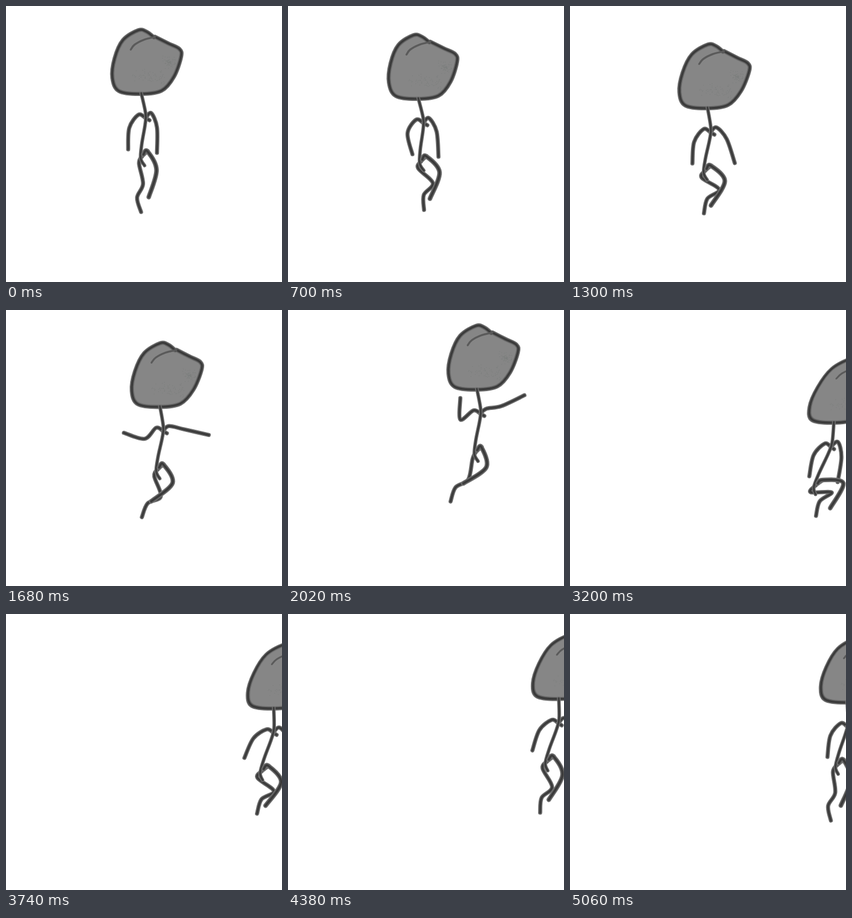
Recreate the animation shown at these times as an HTML page with a canvas. Size 500x500 px, loop 5080 ms.

```html
<!DOCTYPE html>
<html>
<head>
<meta charset="utf-8">
<style>
html, body { margin: 0; width: 100%; height: 100%; overflow: hidden; background: #fff; }
canvas { display: block; }
</style>
</head>
<body>
<canvas id="stage" width="500" height="500"></canvas>
<script>
const ctx = document.getElementById('stage').getContext('2d');
const LOOP = 5080;

// Body: time, then neck x, neck y and sideways lean.
const body = [
  [0, 245, 158, 0],
  [700, 236, 167, -.03],
  [1300, 249, 184, .05],
  [1640, 273, 177, .05],
  [2020, 342, 143, .03],
  [2250, 373, 128, .08],
  [2560, 411, 145, .17],
  [3200, 478, 203, .3],
  [3740, 485, 170, .2],
  [4340, 490, 153, .2],
  [5060, 502, 159, .17]
];

// Gestures: angles of the upper and lower bone in degrees from straight down, positive to the right.
const hangL = [-35, -3], backL = [-50, -19], raisedL = [-54, -179];
const hangR = [22, 0], swingR = [43, 20], reachR = [101, 116];
const stand = [11, -4, 26, -16], crouch = [57, -31, 44, -28], leap = [-11, -38, 15, -54];
const stride = [53, 30, 41, 28], squat = [98, -25, 90, -19];

const limbs = [
  [0, ...hangL, ...hangR, ...stand],
  [1300, ...hangL, ...swingR, ...crouch],
  [2020, ...raisedL, ...reachR, ...leap],
  [2560, ...backL, ...hangR, ...stride],
  [3200, ...hangL, ...hangR, ...squat],
  [3740, ...backL, ...swingR, ...crouch],
  [5060, ...hangL, ...hangR, ...stand]
];

// Hermite interpolation between uneven key times
function sample(keys, time) {
  const last = keys.length - 1;
  let k = 0;
  while (k < last - 1 && time >= keys[k + 1][0]) k++;
  const A = keys[Math.max(k - 1, 0)], B = keys[k], C = keys[k + 1], D = keys[Math.min(k + 2, last)];
  const span = C[0] - B[0], u = Math.min((time - B[0]) / span, 1), v = 1 - u;
  return B.map((b, i) => {
    const into = (C[i] - A[i]) / (C[0] - A[0]), out = (D[i] - b) / (D[0] - B[0]);
    return b + (C[i] - b) * u * u * (3 - 2 * u) + span * u * v * (v * into - u * out);
  }).slice(1);
}

// Smooth curve through a list of [x, y] points
function curve(points) {
  const path = new Path2D(), end = points.length - 1;
  path.moveTo(...points[0]);
  for (let i = 0; i < end; i++) {
    const [a, b, c, d] = [i - 1, i, i + 1, i + 2].map(j => points[Math.min(Math.max(j, 0), end)]);
    path.bezierCurveTo(
      b[0] + (c[0] - a[0]) / 6, b[1] + (c[1] - a[1]) / 6,
      c[0] - (d[0] - b[0]) / 6, c[1] - (d[1] - b[1]) / 6, ...c);
  }
  return path;
}

function stroke(path, width, color) {
  ctx.lineWidth = width;
  ctx.strokeStyle = color;
  ctx.stroke(path);
}

function pencil(path, width) {
  stroke(path, width, '#777');
  stroke(path, width * 0.7, '#555');
  stroke(path, width * 0.35, '#383838');
}

const head = curve([[23, -101], [10, -111], [-5, -114], [-33, -96], [-48, -63], [-52, -28], [-40, -4],
  [0, 1], [37, -5], [59, -30], [72, -66], [69, -80], [49, -90], [25, -102]]);
const fold = curve([[25, -102], [5, -97], [-12, -88], [-19, -79]]);

let seed = 7;
const random = () => (seed = seed * 16807 % 2147483647) / 2147483647;
const spread = size => (random() + random() - 1) * size;
const grain = Array.from({ length: 130 }, (_, i) =>
  i % 2 ? [50 + spread(14), -57 + spread(12)] : [15 + spread(34), -30 + spread(14)]);

function drawHead(x, y, lean) {
  ctx.save();
  ctx.transform(1, 0, -lean, 1, x, y);
  ctx.fillStyle = '#868686';
  ctx.fill(head);
  ctx.fillStyle = '#787c7a';
  for (const [gx, gy] of grain) ctx.fillRect(gx, gy, 1, 1);
  pencil(head, 8);
  stroke(fold, 3.5, '#5a5a5a');
  ctx.restore();
}

function frame() {
  const time = performance.now() % LOOP;
  const [x, y, lean] = sample(body, time);
  const angles = sample(limbs, time);

  const place = ([px, py]) => [x + px - lean * py, y + py];
  const bone = ([px, py], angle, length) => {
    const a = angle * Math.PI / 180 - lean / 2;
    return [px + length * Math.sin(a), py + length * Math.cos(a)];
  };
  // Two bones hang from the last root point; the lower one may bow sideways.
  const limb = (n, width, roots, upper, lower, bow = 0) => {
    const points = roots.map(place);
    const joint = bone(points.at(-1), angles[2 * n], upper);
    const middle = bone(bone(joint, angles[2 * n + 1], lower / 2), angles[2 * n + 1] - 90, bow);
    const tip = bone(joint, angles[2 * n + 1], lower);
    pencil(curve([...points, joint, ...(bow ? [middle] : []), tip]), width);
  };

  ctx.clearRect(0, 0, 500, 500);
  ctx.lineCap = ctx.lineJoin = 'round';
  drawHead(x, y, lean);
  limb(0, 7.5, [[15, 49], [8, 45], [-5, 39]], 29, 39);
  limb(1, 7.5, [[8, 45], [18, 36]], 28, 46);
  limb(2, 7.5, [[12, 105], [2, 114], [-4, 127]], 38, 51, 9);
  pencil(curve([[0, 0], [8, 37], [7, 57], [1, 92], [-1, 118], [6, 131]].map(place)), 6.5);
  limb(3, 8.5, [[4, 111], [11, 105]], 38, 51);
  requestAnimationFrame(frame);
}
frame();
</script>
</body>
</html>
```
